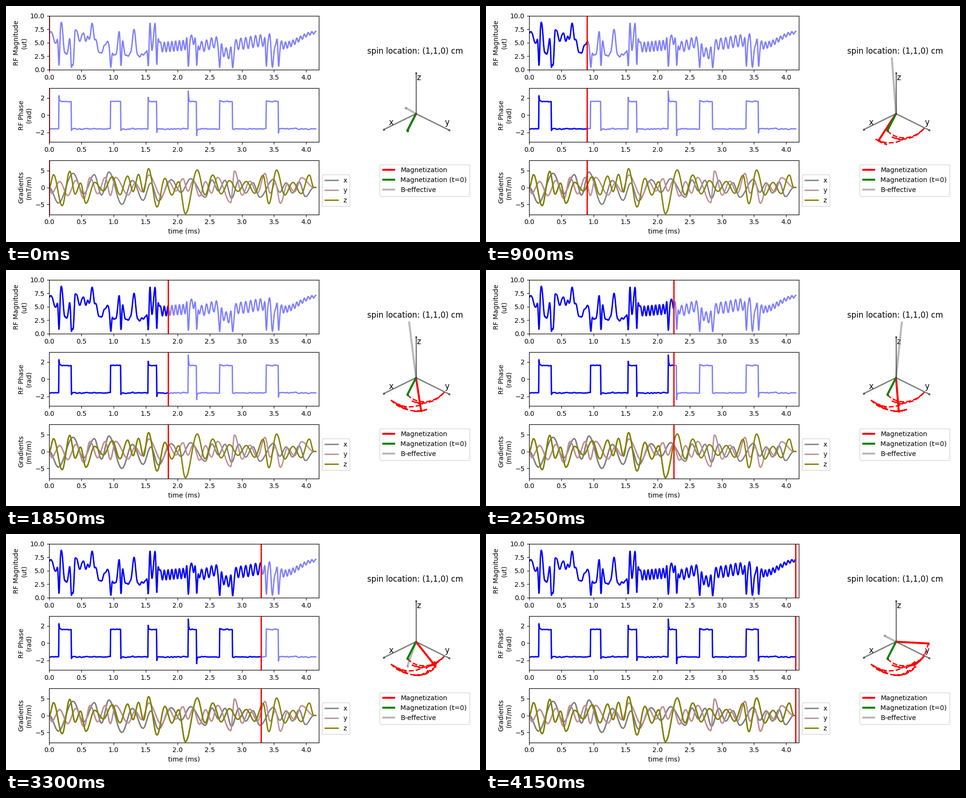
A matplotlib script for the animation above (5030 ms loop, 1000 by 500 pixels).

```python
import numpy as np
import matplotlib.pyplot as plt
from matplotlib.animation import FuncAnimation
from matplotlib.lines import Line2D

W, H, DPI = 1000, 500, 100
LOOP, TICK, STEP = 5030, 10, 50      # ms
T_END, DT = 4.15, 0.005              # pulse time axis, ms
LAST = 83                            # last moving step
t = np.arange(0, T_END + DT / 2, DT)
rng = np.random.default_rng(7)


def swing(points):
    """Cosine easing from one extreme to the next."""
    x, y = np.array(points, float).T
    i = np.clip(np.searchsorted(x, t, side="right") - 1, 0, len(x) - 2)
    u = np.clip((t - x[i]) / (x[i + 1] - x[i]), 0, 1)
    return y[i] + (y[i + 1] - y[i]) * (1 - np.cos(np.pi * u)) / 2


def gradient(peaks, half=0.12):
    """Swing through the main peaks, with small random ones of alternating sign between."""
    points = [(0, 0)]
    for (t0, v0), (t1, v1) in zip(peaks, peaks[1:]):
        points.append((t0, v0))
        odd = int(v0 * v1 > 0)
        n = odd + 2 * max(0, round(((t1 - t0) / half - 1 - odd) / 2))
        for k in range(1, n + 1):
            v = -np.sign(v0) * (-1) ** (k + 1) * rng.uniform(1, 2.4)
            points.append((t0 + (t1 - t0) * k / (n + 1), v))
    return swing(points + [peaks[-1], (4.12, 0), (T_END, 0)])


gx = gradient([(.14, -4.6), (.37, 4.2), (.7, 3.8), (.927, 4.6), (1.13, -5), (1.46, -3.8),
               (1.7, -4), (1.9, 2.3), (2.2, 2.6), (2.43, -2.9), (2.84, -3.2),
               (3.28, -2.9), (3.49, 2.4), (3.99, -2.7)])
gy = gradient([(.035, -1.8), (.54, -3.3), (.635, 3), (.872, 3), (1.03, 3), (1.23, -2.2),
               (1.55, 3.7), (1.75, -2.6), (2.08, 2.6), (2.24, 2), (2.34, -2.6), (2.62, 3),
               (2.825, -4.5), (2.885, 4.9), (3.36, 4.2), (3.6, -4.7), (3.93, 2.9)])
gz = gradient([(.065, 3.8), (.2, -5.4), (.318, 4.8), (.57, -4.7), (.98, 3.2), (1.22, 3.4),
               (1.39, 3.9), (1.545, 5.6), (1.678, -5.8), (1.8, 2.7), (2.12, -7.8),
               (2.305, 5.2), (2.545, 3.7), (3.33, 3.6), (3.42, -4.8), (3.54, 5.2),
               (4.05, 3.7)])

# RF phase flips between two levels, with a decaying overshoot after each flip
flips = [.148, .342, .955, 1.114, 1.538, 1.671, 2.163, 2.294, 2.652, 2.853, 3.378, 3.57]
kicks = [.9, .3, 0, .2, .7, .9, 1.7, .9, .2, 0, 0, .5]
grid = np.arange(0, T_END + 0.025, 0.025)
phase = -1.6 + np.interp(t, grid, rng.normal(0, 0.04, grid.size))
for k, (flip, kick) in enumerate(zip(flips, kicks)):
    after, up = t >= flip, 1 - 2 * (k % 2)
    phase += after * up * (3.2 + kick * np.exp(-np.maximum(t - flip, 0) / 0.006))

# RF magnitude: slow level plus ripple, falling to nearly zero at each flip
level = swing([(0, 7), (.045, 6.8), (.09, 4.8), (.182, 9), (.245, 3.2), (.265, 2.7),
               (.33, 6.2), (.37, .8), (.405, 7.6), (.48, 5.4), (.53, 7), (.565, 5.2),
               (.595, 6.3), (.62, 5.5), (.665, 8.5), (.71, 5.7), (.79, 3), (.9, 5.1),
               (1.03, 2.6), (1.1, 7.5), (1.2, 2.5), (1.26, 2.9), (1.32, 7.3), (1.38, 2.5),
               (1.5, 3), (1.565, 9.2), (1.6, 3.6), (1.655, 9.8), (1.74, 4.2), (2.1, 4.5),
               (2.18, 6.5), (2.24, 5), (2.27, 6.8), (2.36, 4.3), (2.6, 5.1), (2.77, 3),
               (2.95, 4.8), (3.32, 5.4), (3.42, 6.5), (3.48, 1.2), (3.54, 6), (3.64, 4.5),
               (T_END, 6.9)])
cycles = np.cumsum(np.where(abs(t - 2.8) < 0.65, 13.1, 17)) * DT
cycles -= np.interp(3.06, t, cycles)
size = np.interp(t, [1.6, 1.75, 3.3, 3.6, 4.1], [.2, .9, 1.1, .7, .25])
mag = level + size * np.cos(2 * np.pi * cycles)
for flip in flips:
    mag *= 1 - 0.9 * np.exp(-((t - flip - 0.003) / 0.016) ** 2)

# Spin panel geometry in pixels
O = np.array([865, 228.3])
EX, EY, EZ = np.array([-68, 33.5]), np.array([69.5, 34.5]), np.array([0, -86])

# Effective field at (1, 1, 0) cm with mild perspective
K = 0.055
bx, by, bz = K * mag * np.cos(phase), K * mag * np.sin(phase), K * 10 * (gx + gy)
near = 0.61 * (bx + by) + 0.5 * bz
zoom = 1 / np.maximum(1 - 0.35 * near, 0.3)
b_tip = O + zoom[:, None] * (np.outer(bx, EX) + np.outer(by, EY) + np.outer(bz, EZ))

# Magnetization tip: time, screen angle from straight down (deg), radius (px)
turns = np.array([(0, -27, 40), (.28, 63, 67), (.44, -9, 50), (.55, 14, 57), (.73, -38, 69),
                  (.82, -17, 68), (.9, -33, 67), (1.02, -49, 71), (1.22, -15, 70),
                  (1.31, -32, 69), (1.45, 8, 71), (2.25, 7, 71), (2.41, 37, 67),
                  (2.55, 10, 71), (2.8, 35, 58), (3.3, 45, 64), (3.63, 58, 65),
                  (T_END, 87, 68)])
wobble = np.interp(t, [1.4, 1.6, 3.6, 4], [0, 11, 8, 0]) * np.sin(2 * np.pi * (t - 1.45) / 0.27)
ang = np.radians(swing(turns[:, :2]) + wobble)
rad = swing(turns[:, ::2])
m_tip = O + np.column_stack([rad * np.sin(ang), rad * np.cos(ang)])

fig = plt.figure(figsize=(W / DPI, H / DPI), dpi=DPI, facecolor="white")


def signal_axes(row, ylim, label):
    bottom = 58.46 + 153.27 * (2 - row)
    ax = fig.add_axes([91.4 / W, bottom / H, 568.8 / W, 114.06 / H])
    ax.set(xlim=(0, 4.2), ylim=ylim, ylabel=label)
    return ax


ax_mag = signal_axes(0, (0, 10), "RF Magnitude\n(ut)")
ax_ph = signal_axes(1, (-np.pi, np.pi), "RF Phase\n(rad)")
ax_g = signal_axes(2, (-8, 8), "Gradients\n(mT/m)")
ax_mag.set_yticks(np.arange(0, 10.1, 2.5))
ax_g.set_xlabel("time (ms)")

signals = [(ax_mag, mag, "blue"), (ax_ph, phase, "blue"),
           (ax_g, gx, "gray"), (ax_g, gy, "rosybrown"), (ax_g, gz, "olive")]
for ax, y, color in signals:
    ax.plot(t, y, color=color, alpha=0.5 if color == "blue" else 1, lw=2)
ax_g.legend(ax_g.lines, "xyz", loc="upper left", bbox_to_anchor=(1, 0.8))

spin = fig.add_axes([752 / W, 1 - 336 / H, 226 / W, 227 / H])
spin.set(xlim=(752, 978), ylim=(336, 109))
spin.axis("off")
spin.text(863, 96, "spin location: (1,1,0) cm", size=12, ha="center", va="center")
for x, y, s in ((812.7, 245, "x"), (930.5, 245, "y"), (871, 150, "z")):
    spin.text(x, y, s, size=12, ha="center", va="center_baseline")
B_STYLE = dict(color="gray", alpha=0.55, lw=3, solid_capstyle="butt")
M_STYLE = dict(color="red", lw=3, solid_capstyle="butt")
M0_STYLE = dict(M_STYLE, color="green")
spin.legend(handles=[Line2D([], [], label="Magnetization", **M_STYLE),
                     Line2D([], [], label="Magnetization (t=0)", **M0_STYLE),
                     Line2D([], [], label="B-effective", **B_STYLE)],
            loc="upper left", bbox_to_anchor=(788, 335.8),
            bbox_transform=spin.transData, borderaxespad=0)

# Keep the still parts as one background picture so each frame draws fast
fig.canvas.draw()
still = np.array(fig.canvas.buffer_rgba())
for ax in (ax_mag, ax_ph, ax_g, spin):
    for part in [ax.xaxis, ax.yaxis, ax.patch, ax.get_legend(), *ax.lines, *ax.texts]:
        if part is not None:
            part.set_visible(False)
fig.figimage(still, origin="upper", zorder=-1)


def arrow(tip, z, head=4, **style):
    line, = spin.plot(*np.array([O, tip]).T, marker="o", markevery=[1], ms=head,
                      mew=0, zorder=z, **style)
    return line


done = [(ax.plot([], [], color=color, lw=2)[0], y) for ax, y, color in signals]
cursors = [ax.axvline(0, color="red", lw=2) for ax in (ax_mag, ax_ph, ax_g)]
b_arrow = arrow(b_tip[0], 1, **B_STYLE)
for e in (EX, EY, EZ):
    arrow(O + e, 2, head=3.2, color="black", alpha=0.5, lw=2, markerfacecolor="black")
trail, = spin.plot([], [], "--", color="red", lw=2, zorder=3)
m_arrow = arrow(m_tip[0], 4, **M_STYLE)
arrow(m_tip[0], 5, **M0_STYLE)


def update(n):
    k = min(n * TICK // STEP, LAST)
    i = round(k * STEP / 1000 / DT)
    for line, y in done:
        line.set_data(t[:i + 1], y[:i + 1])
    for c in cursors:
        c.set_xdata([t[i], t[i]])
    trail.set_data(*m_tip[:i + 1].T)
    for line, tip in ((m_arrow, m_tip[i]), (b_arrow, b_tip[i])):
        line.set_data(*np.array([O, tip]).T)
    return []


anim = FuncAnimation(fig, update, frames=LOOP // TICK, interval=TICK,
                     init_func=lambda: update(0), repeat=True, repeat_delay=0)
plt.show()
```
